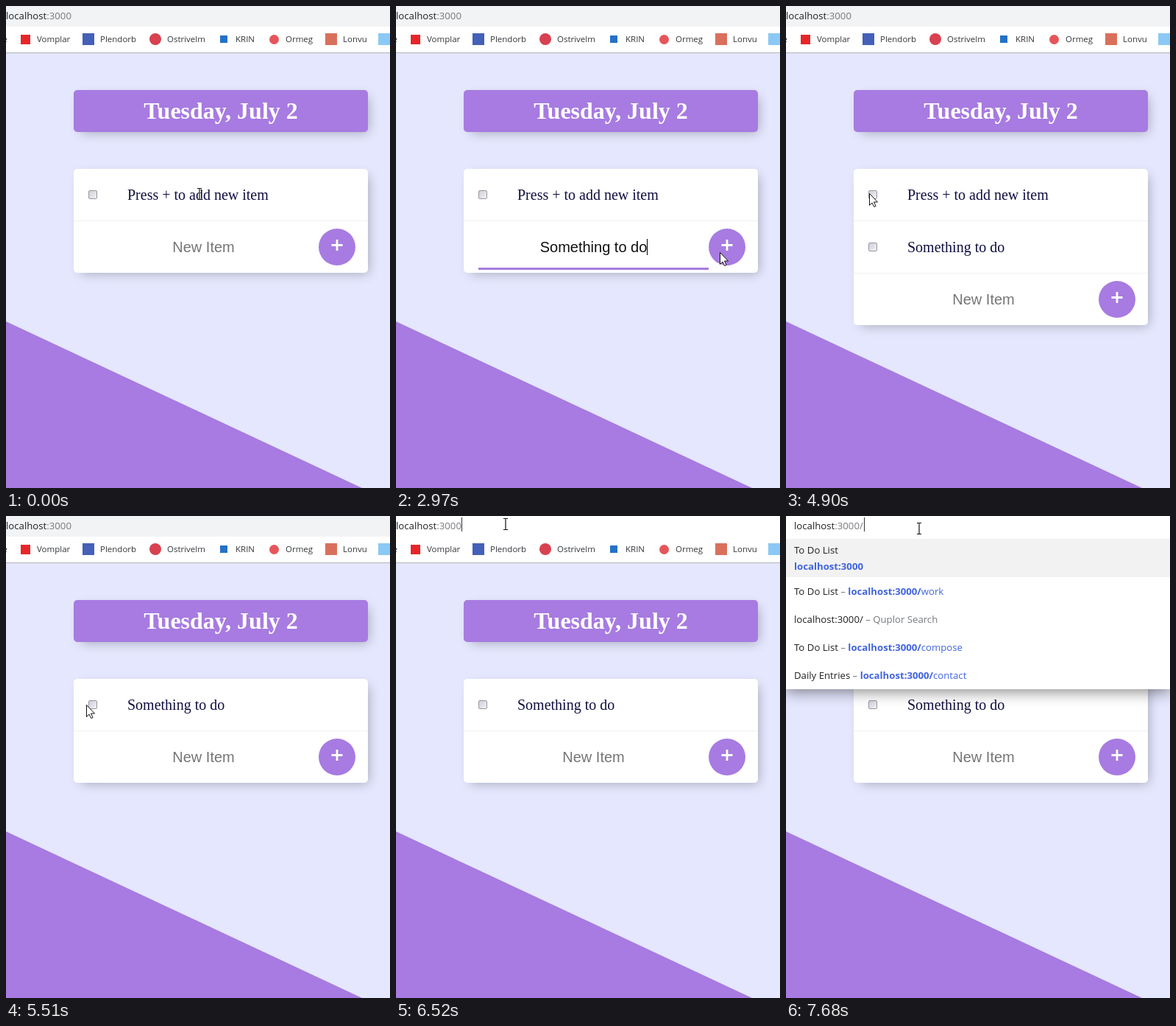
These frames come from a looping animation (522x654 px, 8000 ms). An HTML page:

```html
<!DOCTYPE html>
<html lang="en">
<head>
<meta charset="utf-8">
<title>To Do List</title>
<style>
  html, body { margin: 0; width: 100%; height: 100%; overflow: hidden; }
  [hidden] { display: none !important; }
  #stage { position: relative; width: 522px; height: 654px; overflow: hidden; background: #e4e7fd; }
  #stage div, #stage svg { position: absolute; box-sizing: border-box; white-space: pre; }
  #slope { inset: 0; background: #a77be1; clip-path: polygon(0 428px, 484px 654px, 0 654px); }

  .card { left: 92px; width: 400px; border-radius: 5px; background: #fff; box-shadow: 5px 5px 15px -5px rgba(0,0,0,.3); }
  #heading { top: 114px; height: 57px; background: #a77be1; color: #fff; text-align: center;
    font: bold 32px/57px "Liberation Serif", serif; }
  #list { top: 221px; }
  .item { left: 0; top: 0; width: 400px; height: 71px; border-bottom: 1px solid #f1f1f1; }
  .label { left: 73px; top: 24px; font: 20px/23px "Liberation Serif", serif; color: #100e40;
    text-decoration-color: #a683e3; }
  .check { left: 20px; top: 29px; width: 12px; height: 12px; border: 1px solid #98989f; border-radius: 2px;
    background: linear-gradient(135deg, #cfd0d8, #f1f1f6); }
  .check svg { left: 0; top: 0; }
  #form { left: 0; width: 400px; height: 70px; }
  #field { left: 20px; top: 0; width: 313px; text-align: center; font: 20px/70px "Liberation Sans", sans-serif; }
  #underline { left: 20px; top: 63px; width: 313px; height: 3px; background: #a77be1; }
  #button { left: 333px; top: 10px; width: 50px; height: 50px; border-radius: 50%; background: #a77be1; }
  #ring { left: 332px; top: 9px; width: 52px; height: 52px; border: 1px solid #e59700; border-radius: 1px; }
  #caret { top: 24px; width: 1px; height: 22px; background: #000; }

  #bar { left: 0; top: 0; width: 522px; height: 28px; }
  #bookmarks { left: 0; top: 28px; width: 522px; height: 36px; background: #fff; border-bottom: 1px solid #b3b3ba;
    font: 11.5px/20px "Open Sans", sans-serif; color: #33363a; }
  .mark { top: 7px; }
  .url { font: 13.2px/20px "Open Sans", sans-serif; color: #202124; }
  .url i { font-style: normal; color: #777a7e; }
  .url b, .url u { color: #4064e0; text-decoration: none; }
  #address { top: 3px; }
  #address.selected { background: #0078d7; }
  #address.selected, #address.selected i { color: #fff; }
  #urlCaret { top: 2px; width: 1px; height: 19px; background: #333; }
  #menu { left: 0; top: 28px; width: 522px; height: 207px; background: #fff; box-shadow: 0 4px 18px rgba(0,0,0,.45); }
  #menu .first { left: 0; top: 3px; width: 522px; height: 52px; background: #f2f2f2; }
  #menu .url { left: 11px; }
  #glow { width: 24px; height: 24px; border-radius: 50%; background: rgba(247,240,60,.72); }
  #stage .pointer { overflow: visible; width: 1px; height: 1px; }
</style>
</head>
<body>
<div id="stage">
  <div id="slope"></div>
  <div id="heading" class="card">Tuesday, July 2</div>
  <div id="list" class="card">
    <div id="first" class="item"><div class="check"><svg id="tick" width="10" height="10"><path d="M2 5l2 3 4-7" fill="none" stroke="#333a55" stroke-width="1.8"/></svg></div><div id="firstLabel" class="label">Press + to add new item</div></div>
    <div id="second" class="item"><div class="check"></div><div class="label">Something to do</div></div>
    <div id="form">
      <div id="field"></div>
      <div id="underline"></div>
      <div id="caret"></div>
      <div id="button"><svg style="left:0;top:0" width="50" height="50"><path d="M17.5 22.5h15M25 15v15" stroke="#fff" stroke-width="2.8"/></svg></div>
      <div id="ring"></div>
    </div>
  </div>
  <div id="bookmarks"></div>
  <div id="menu">
    <div class="first"></div>
  </div>
  <div id="bar"></div>
  <div id="address" class="url"></div>
  <div id="urlCaret"></div>
  <div id="glow"></div>
  <svg id="arrow" class="pointer"><path d="M.5 .5V16.5L4 13l2.7 5.5 2.4-1L6.5 12H11.5Z" fill="#fff" stroke="#111"/></svg>
  <svg id="beam" class="pointer" fill="none">
    <defs><path id="beamShape" d="M-3-7.5h2.5l.5 .5 .5-.5H3M0-7V7M-3 7.5h2.5l.5-.5 .5 .5H3"/></defs>
    <use href="#beamShape" stroke="#fff" stroke-opacity=".6" stroke-width="2.5"/>
    <use href="#beamShape" stroke="#111" stroke-width="1.2"/>
  </svg>
</div>
<script>
const LOOP = 8000;
const $ = id => document.getElementById(id);

function add(parent, className, css, html = '') {
  const el = document.createElement('div');
  el.className = className;
  el.style.cssText = css;
  el.innerHTML = html;
  parent.append(el);
}

// label, text x, icon centre x, icon size, colour, corner radius
const bookmarks = [
  ['Vomplar', 42, 26, 13, '#e8262a', 0],
  ['Plendorb', 128, 112, 16, '#4460b8', 0],
  ['Ostrivelm', 219, 203, 16, '#d8414f', 8],
  ['KRIN', 312, 295.5, 10, '#2471c8', 0],
  ['Ormeg', 380, 364, 13, '#e5565a', 7],
  ['Lonvu', 458, 442, 16, '#d9705c', 0],
  ['', 540, 514, 16, '#8cc8f5', 0],
];
for (const [label, x, cx, size, colour, radius] of bookmarks) {
  add($('bookmarks'), '', `left:${cx - size / 2}px;top:${17 - size / 2}px;width:${size}px;height:${size}px;background:${colour};border-radius:${radius}px`);
  add($('bookmarks'), 'mark', `left:${x}px`, label);
}
add($('bookmarks'), 'mark', 'right:520px', 'e');

const suggestions = [
  [46, 'To Do List'],
  [68, '<b>localhost:3000</b>'],
  [102, 'To Do List<i> – </i><b>localhost:3000/</b><u>work</u>'],
  [140, 'localhost:3000/<i> – Quplor Search</i>'],
  [178, 'To Do List<i> – </i><b>localhost:3000/</b><u>compose</u>'],
  [216, 'Daily Entries<i> – </i><b>localhost:3000/</b><u>contact</u>'],
];
for (const [y, html] of suggestions) add($('menu'), 'url', `top:${y - 38}px`, html);

// time, x, y, pointer kind from that time on
const path = [
  [0, 262, 255, 'beam'], [70, 262, 255, 'beam'], [250, 265, 277, 'arrow'],
  [350, 268, 293, 'beam'], [660, 273, 327, 'beam'], [1860, 273, 327, 'none'],
  [2330, 273, 327, 'beam'], [2470, 273, 327, 'beam'], [2850, 425, 333, 'arrow'],
  [2980, 441, 334, 'arrow'], [3620, 441, 334, 'arrow'], [4290, 113, 254, 'arrow'],
  [4950, 113, 254, 'arrow'], [5130, 109, 257, 'arrow'], [5510, 109, 257, 'arrow'],
  [5880, 119, 28, 'beam'], [5980, 121, 6, 'beam'], [6260, 121, 6, 'beam'],
  [6820, 180, 17, 'beam'], [LOOP, 180, 17, 'beam'],
];

function pointerAt(t) {
  const i = path.findIndex(key => key[0] > t);
  const [t0, x0, y0, kind] = path[i - 1], [t1, x1, y1] = path[i];
  const k = (t - t0) / (t1 - t0);
  return { x: Math.round(x0 + (x1 - x0) * k), y: Math.round(y0 + (y1 - y0) * k), kind };
}

function render(t) {
  const during = (...spans) => spans.some(([a, b]) => t >= a && t < b);
  const show = (id, visible) => $(id).toggleAttribute('hidden', !visible);
  const move = (id, x, y) => {
    $(id).style.left = x + 'px';
    $(id).style.top = y + 'px';
  };

  const hasFirst = t < 5510, hasSecond = t >= 3430;
  const formTop = (hasFirst + hasSecond) * 71;
  show('first', hasFirst);
  show('second', hasSecond);
  move('second', 0, hasFirst ? 71 : 0);
  move('form', 0, formTop);
  $('list').style.height = formTop + 70 + 'px';

  const done = during([4980, 5510]);
  show('tick', done);
  $('firstLabel').style.textDecorationLine = done ? 'line-through' : 'none';

  const typed = during([1860, 3430]);
  $('field').textContent = typed ? 'Something to do' : 'New Item';
  $('field').style.color = typed ? '#111' : '#757575';
  show('underline', during([700, 3000]));
  show('ring', during([3000, 3430]));
  show('caret', during([700, 1250], [1800, 2330], [2880, 3000]));
  $('caret').style.left = (typed ? 249 : 177) + 'px';

  const slash = t >= 7520;
  $('bar').style.background = t < 5900 ? '#f1f3f4' : t < 6190 ? '#e8eaed' : '#fff';
  $('address').innerHTML = 'localhost<i>:3000' + (slash ? '/' : '') + '</i>';
  $('address').style.left = (slash ? 11 : 0) + 'px';
  $('address').classList.toggle('selected', during([6190, 6520]));
  show('urlCaret', during([6520, 7050], [7520, LOOP]));
  $('urlCaret').style.left = (slash ? 106 : 89) + 'px';
  show('menu', t >= 7600);

  const { x, y, kind } = pointerAt(t);
  show('arrow', kind === 'arrow');
  show('beam', kind === 'beam');
  move('arrow', x, y);
  move('beam', x + .5, y);
  show('glow', during([700, 850], [3000, 3120], [4590, 4670], [6130, 6260]));
  move('glow', x - 14, y - 12);
}

const start = performance.now();
function tick() {
  render((performance.now() - start) % LOOP);
  requestAnimationFrame(tick);
}
tick();
</script>
</body>
</html>
```
